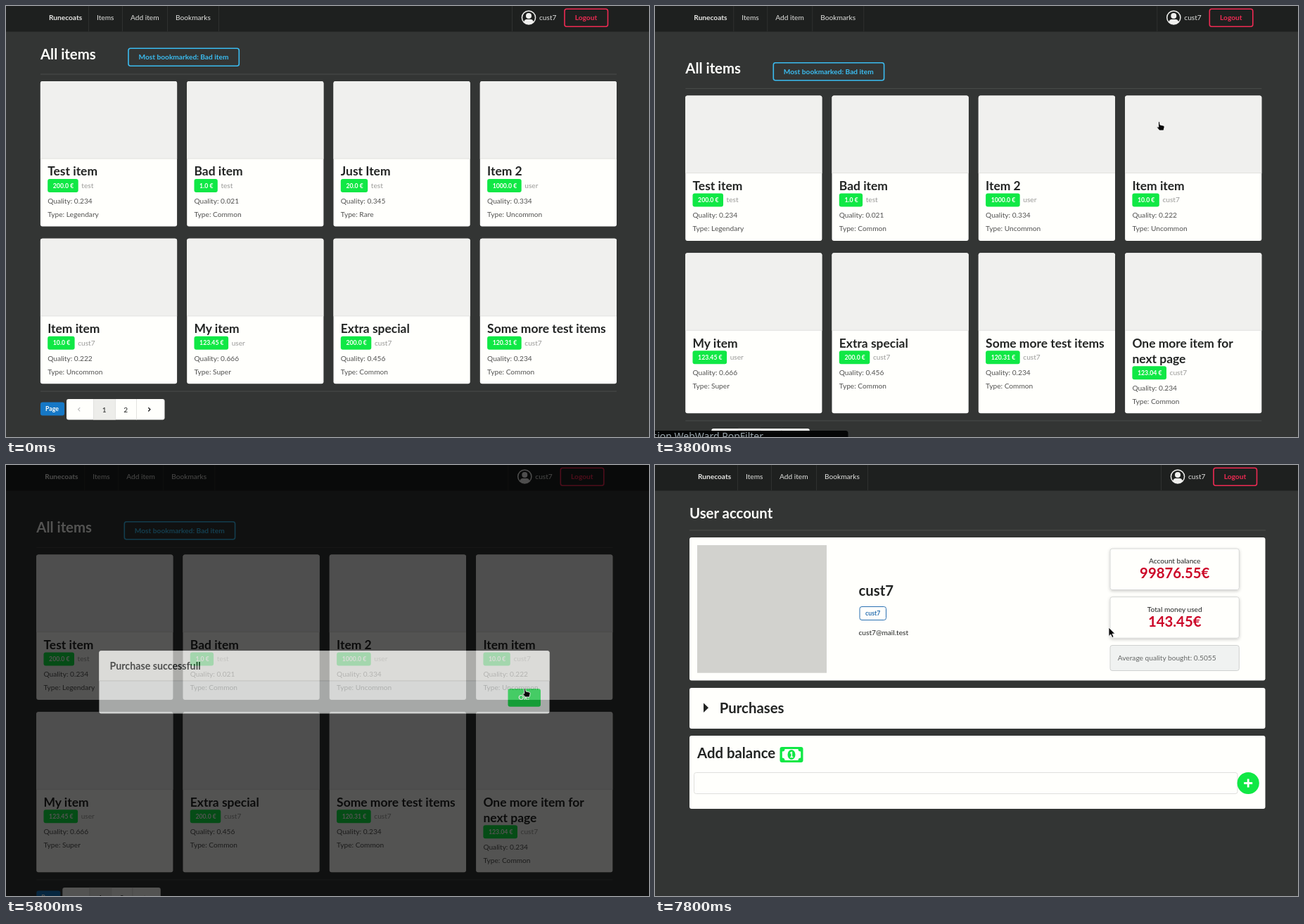
Recreate the animation shown at these times as an HTML page. Size 914 by 613 pixels, loop 8 s.

```html
<!DOCTYPE html>
<html lang="en">
<head>
<meta charset="utf-8">
<title>Item marketplace</title>
<style>
html, body { margin: 0; width: 100%; height: 100%; overflow: hidden; background: #333534; }
svg { display: block; width: 914px; height: 613px; font-family: Lato, sans-serif; }
.status { font: 14px "Noto Sans", sans-serif; }
</style>
</head>
<body>
<svg id="stage" viewBox="0 0 914 613"></svg>
<script>
const WHITE = '#fffffc', INK = '#222423', DARK = '#1e201f', GREEN = '#10e845', BLUE = '#1678c6', RED = '#ee2a53';
const BASE = 10.17, SMALL = 8.72, H1 = 20.35, H2 = 17.44, H3 = 13.08;
const LOOP = 8000, USER = 'cust7';

const rect = (x, y, w, h, fill, more = '') =>
  `<rect x="${x}" y="${y}" width="${w}" height="${h}" fill="${fill}" ${more}/>`;
const box = (x, y, w, h, fill, more = '') => rect(x, y, w, h, fill, 'rx="3" ' + more);
const path = (d, fill, more = '') => `<path d="${d}" fill="${fill}" ${more}/>`;
const text = (x, y, str, fill, size = BASE, more = '') =>
  `<text x="${x}" y="${y}" fill="${fill}" font-size="${size}" ${more}>${str}</text>`;
const bold = (x, y, str, fill, size = BASE, more = '') => text(x, y, str, fill, size, 'font-weight="700" ' + more);
const MID = 'text-anchor="middle"';
const group = (id, body, more = '') => `<g id="${id}" ${more}>${body}</g>`;
const rule = y => rect(49, y, 819, 1, '#4a4c4b');
const outline = color => `stroke="${color}" stroke-width="1.6"`;

function topBar() {
  const avatar = `<g transform="translate(743 16.5)"><circle r="9.6" fill="none" stroke="#f0f0ee" stroke-width="1.5"/>
    <circle cy="-2.4" r="4" fill="#f0f0ee"/>${path('M-7 6.6Q-6 2.6-3 2.6H3Q6 2.6 7 6.6A9.6 9.6 0 0 1-7 6.6Z', '#f0f0ee')}</g>`;
  const links = [[129, 'Items'], [177, 'Add item'], [241, 'Bookmarks']];
  return rect(-10, 0, 934, 36.5, DARK) +
    [117, 165, 229, 302, 719].map(x => rect(x, 0, 1, 36, '#2f3130')).join('') +
    bold(61, 20.2, 'Runecoats', '#e6e6e4') +
    links.map(([x, s]) => text(x, 20.2, s, '#e2e2e0')).join('') +
    avatar + text(758, 19.8, USER, '#e2e2e0') +
    box(794, 4.3, 61.5, 25, 'none', outline(RED)) + bold(824.5, 20.3, 'Logout', RED, BASE, MID);
}

function card(x, y, h, item) {
  const [name, price, seller, quality, type] = item.split('|');
  const lines = name.split('/'), left = x + 10.3;
  const labelW = 23.1 + 5.1 * (price.length - 1);
  const titles = lines.map((s, i) => bold(left, y + 134.3 + 22 * i, s, 'currentColor', H2)).join('');
  y += 22 * (lines.length - 1);
  const top = y - 22 * (lines.length - 1);
  return box(x, top, 194.2, h, WHITE) +
    path(`M${x} ${top + 110}v-107q0-3 3-3h188.2q3 0 3 3v107z`, '#f0f0ee') +
    rect(x, top + 109.6, 194.2, 1, '#e2e2df') +
    `<g class="title" color="${INK}">${titles}</g>` +
    box(left, y + 139, labelW, 19, GREEN) + bold(left + 7.6, y + 151.6, price + ' €', WHITE, SMALL) +
    text(left + labelW + 4.6, y + 151.8, seller, '#9a9a98') +
    text(left, y + 174, 'Quality: ' + quality, '#525251') +
    text(left, y + 193, 'Type: ' + type, '#525251');
}

function listPage(items, dy, lowerH) {
  const cards = items.map((item, i) =>
    card(48.9 + 208.3 * (i % 4), (i < 4 ? 107 : 330.8) + dy, i < 4 ? 206.5 : lowerH, item)).join('');
  const end = dy + lowerH - 206.5;
  const pager = rule(547.5) + box(49, 563.5, 34, 19, BLUE) + bold(56, 576.2, 'Page', WHITE, SMALL) +
    box(86, 559, 139.5, 29.5, WHITE) + rect(124.5, 559, 30.5, 29.5, '#ededea') +
    [124, 155, 185].map(x => rect(x, 559, 1, 29.5, '#e2e2df')).join('') +
    path('M105.2 571.2l-2.6 2.6 2.6 2.6', 'none', 'stroke="#bbb" stroke-width="1.2"') +
    path('M202.3 571.2l2.6 2.6-2.6 2.6', 'none', 'stroke="#222" stroke-width="1.4"') +
    text(139.8, 577.5, '1', INK, BASE, MID) + text(170.3, 577.5, '2', INK, BASE, MID);
  return bold(49, 75.7 + dy, 'All items', WHITE, H1) +
    box(174, 60.3 + dy, 157.3, 25, 'none', outline('#3bbcf0')) +
    bold(252.5, 76.4 + dy, 'Most bookmarked: Bad item', '#3bbcf0', BASE, MID) +
    rule(96.5 + dy) + cards + `<g transform="translate(0 ${end})">${pager}</g>`;
}

function detailPage() {
  const cart = path('M683.5 155.8h2l1.6 5.8h5.4', 'none', 'stroke="#fffffc" stroke-width="1.2"') +
    path('M686 156.8h7l-.9 3.7h-5.2z', WHITE) +
    '<circle cx="687.6" cy="163.3" r="1" fill="#fffffc"/><circle cx="691.7" cy="163.3" r="1" fill="#fffffc"/>';
  return box(49, 58, 818.5, 202, DARK) + rect(59.5, 68.3, 183.7, 181.7, WHITE) +
    bold(289.5, 133, 'Just Item', WHITE, H1) + bold(289.5, 169.6, 'test', '#3f7cb8', H3) +
    box(290.3, 183.6, 69.7, 19, '#f4550a') + bold(297.7, 196.3, 'Quality: 0.345', WHITE, SMALL) +
    box(365, 183.6, 55.7, 19, '#e00a90') + bold(372.2, 196.3, 'Type: Rare', WHITE, SMALL) +
    text(712.6, 107, '20.0', '#f2234f', 40.7, MID) + bold(712.6, 123.3, 'EUROS', '#f0f0ee', BASE, MID) +
    box(647.5, 147, 130.5, 26, BLUE, 'id="buy"') + cart + bold(700.4, 163.6, 'Buy item', WHITE) +
    path('M647.5 220v-23.5q0-3 3-3h124.5q3 0 3 3v23.500z', '#a30bc4') +
    path('M681.3 202h6.600v8.600l-3.300-2.800-3.300 2.800z', WHITE) + bold(697, 210, 'Bookmark', WHITE) +
    path('M647.5 220h130.5v24q0 3-3 3h-124.500q-3 0-3-3z', WHITE) + text(657.8, 237, 'Bookmark name...', '#c4c4c1');
}

function accountPage() {
  const stat = (y, label, value) => box(647, y, 183.3, 58.5, WHITE, 'stroke="#d6d7d6" filter="url(#shade)"') +
    text(738.7, y + 21.3, label, INK, BASE, MID) + bold(738.7, y + 42.2, value, '#cc0628', H1, MID);
  const note = box(177.5, 401, 33, 22, GREEN) +
    path('M184.500 404h19q0 3.500 3.700 3.500v9q-3.700 0-3.700 3.500h-19q0-3.500-3.700-3.500v-9q3.700 0 3.700-3.500z', WHITE) +
    '<ellipse cx="194" cy="412" rx="5.500" ry="7" fill="#10e845"/>' +
    path('M191.800 409.300l2-1.500h1.300v7h1.300v1.400h-4.200v-1.400h1.300v-4.900l-1.100.6z', WHITE);
  return bold(49, 75.7, 'User account', WHITE, H1) + rule(92.3) +
    box(49, 103, 818.5, 203.5, WHITE) + rect(60, 114, 184, 181.700, '#d2d2ce') +
    bold(289.5, 185.6, USER, INK, H1) +
    box(291, 201.5, 37.5, 19, WHITE, 'stroke="#2a71b2"') + bold(309.7, 214.3, USER, '#2a71b2', SMALL, MID) +
    text(289.5, 242, USER + '@mail.test', INK) +
    stat(119, 'Account balance', '99876.55€') + stat(187.7, 'Total money used', '143.45€') +
    box(647, 256.5, 183.3, 36, '#f0f2f1', 'stroke="#cfd1d0"') +
    text(657.8, 278.3, 'Average quality bought: 0.5055', '#666867') +
    box(49, 317, 818.5, 58, WHITE) + path('M69 338.500l7 6.700-7 6.700z', INK) + bold(91.8, 353, 'Purchases', INK, H1) +
    box(49, 385, 818.5, 104, WHITE) + bold(60, 416.6, 'Add balance', INK, H1) + note +
    box(55.5, 437.5, 772.5, 30, WHITE, 'stroke="#dfdfdd"') +
    `<circle cx="843.2" cy="452.5" r="15.600" fill="${GREEN}"/>` +
    path('M843.200 446.500v12M837.200 452.500h12', 'none', 'stroke="#fffffc" stroke-width="2.800"');
}

const modal = box(131.3, 264, 653.7, 91, '#f7f9f8') +
  path('M131.300 307.500v-40.500q0-3 3-3h647.700q3 0 3 3v40.500z', WHITE) + rect(131.3, 307, 653.7, 1, '#d4d5d4') +
  bold(146.7, 290.8, 'Purchase successfull', INK, 14.53) +
  box(724.7, 319, 47.5, 26, GREEN, 'id="ok"') + bold(748, 335.6, 'Ok!', WHITE, BASE, MID);

const bad = 'Bad item|1.0|test|0.021|Common', first = 'Test item|200.0|test|0.234|Legendary';
const rest = ['Item 2|1000.0|user|0.334|Uncommon', `Item item|10.0|${USER}|0.222|Uncommon`,
  'My item|123.45|user|0.666|Super', `Extra special|200.0|${USER}|0.456|Common`,
  `Some more test items|120.31|${USER}|0.234|Common`];

const cursorLine = 'stroke="#fff" stroke-width=".8" stroke-linejoin="round"';
const stage = document.getElementById('stage');
stage.innerHTML = `<defs><filter id="shade" x="-5%" y="-10%" width="110%" height="130%">
  <feDropShadow dx="0" dy="1.5" stdDeviation="2" flood-opacity=".2"/></filter></defs>` +
  rect(0, 0, 914, 613, '#333534') +
  group('page', topBar() +
    group('shop', listPage([first, bad, 'Just Item|20.0|test|0.345|Rare', ...rest], 0, 206.5)) +
    group('detail', detailPage()) +
    group('after', listPage([first, bad, ...rest, `One more item for/next page|123.04|${USER}|0.234|Common`], 20.4, 228)) +
    group('account', accountPage())) +
  group('dimmer', rect(0, 0, 914, 613, '#000', 'opacity=".85"') + group('modal', modal)) +
  group('status', path('M0 604h271q3.500 0 3.500 3.500v5.500h-274.500z', '#050606') +
    text(0, 617, '', '#9aa6ad', 14, 'id="statusText" class="status" text-anchor="end"')) +
  group('arrow', path('M0 0v12.500l2.800-2.600 2 4.600 2.200-1-2-4.400h3.800z', '#080808', cursorLine)) +
  group('hand', path('M-1.500 0q1.500-1 2 .5l.5 3.500 5 1.200q1.500.5 1 2.300l-1 4.500h-6l-3.500-4.200q-.3-1.500 2.300-.6z', '#080808', cursorLine));

const el = id => document.getElementById(id);
const show = (id, on) => el(id).setAttribute('display', on ? 'inline' : 'none');
const move = (id, value) => el(id).setAttribute('transform', value);
const within = (t, a, b) => t >= a && t < b;
const ease = x => 1 - (1 - Math.min(1, Math.max(0, x))) ** 2.2;
const titles = el('shop').querySelectorAll('.title');

// Pointer stops: time, x, y
const stops = [[300, 228, 252], [700, 537, 246], [900, 463, 246], [1000, 463, 246], [1100, 515, 237],
  [1200, 515, 237], [1300, 511, 238], [1400, 510, 237], [1600, 510, 237], [1700, 515, 232], [2100, 515, 232],
  [2200, 703, 175], [2300, 703, 175], [2400, 711, 171], [2800, 717, 165], [4300, 717, 165],
  [4800, 709, 331], [4900, 730, 318], [5100, 738, 318], [6000, 738, 318], [6300, 735, 80], [6400, 735, 80],
  [6500, 738, 19], [6600, 738, 19], [6700, 739, 12], [7700, 739, 12], [7800, 645, 231], [LOOP, 645, 231]];

function pointer(t) {
  const i = Math.max(1, stops.findIndex(s => s[0] > t));
  const [a, b] = [stops[i - 1], stops[i]];
  const k = (t - a[0]) / (b[0] - a[0]);
  return [a[1] + (b[1] - a[1]) * k, a[2] + (b[2] - a[2]) * k];
}

function draw(t) {
  const pages = { shop: [0, 1700], detail: [1700, 3800], after: [3800, 7300], account: [7300, LOOP] };
  for (const id in pages) show(id, within(t, ...pages[id]));

  // A scrollbar pushes the page left while no dialog is open
  const shift = within(t, 3800, 3930) || within(t, 5750, 7300) ? -5.7 : 0;
  move('page', `translate(${shift})`);

  const closing = t >= 5750;
  const p = closing ? 1 - ease((t - 5750) / 500) : ease((t - 3930) / 500);
  const scale = closing ? 0.9 + 0.1 * p : 0.8 + 0.2 * p;
  show('dimmer', p > 0);
  el('dimmer').setAttribute('opacity', p);
  el('modal').setAttribute('opacity', p);
  move('modal', `translate(${458 + shift} 280) scale(${scale}) translate(-458 -280)`);

  titles[2].setAttribute('color', within(t, 1100, 1700) ? '#1f64b0' : INK);
  el('buy').setAttribute('fill', within(t, 3100, 3300) ? '#0a5c9e' : t >= 2400 ? '#0a6fbb' : BLUE);
  el('ok').setAttribute('fill', within(t, 5000, 5750) ? '#0ed53e' : GREEN);

  const link = within(t, 1300, 1900), wait = within(t, 3600, 4300), user = within(t, 6700, 7500);
  show('status', link || wait || user);
  el('statusText').textContent = link ? 'marketplace.herokuapp.com/items/3'
    : wait ? 'Waiting for extension WebWard PopFilter' : 'marketplace.herokuapp.com/account';
  el('statusText').setAttribute('x', wait ? 154 : 205);

  const hand = within(t, 2400, 4400) || within(t, 4900, 6100) || within(t, 6500, 7800);
  const at = `translate(${pointer(t)})`;
  show('arrow', t >= 300 && !hand);
  show('hand', hand);
  move('arrow', at);
  move('hand', at);
}

const start = performance.now();
let last = -1;
function tick() {
  const t = Math.floor((performance.now() - start) % LOOP / 100) * 100;
  if (t !== last) draw(last = t);
  requestAnimationFrame(tick);
}
tick();
</script>
</body>
</html>
```
